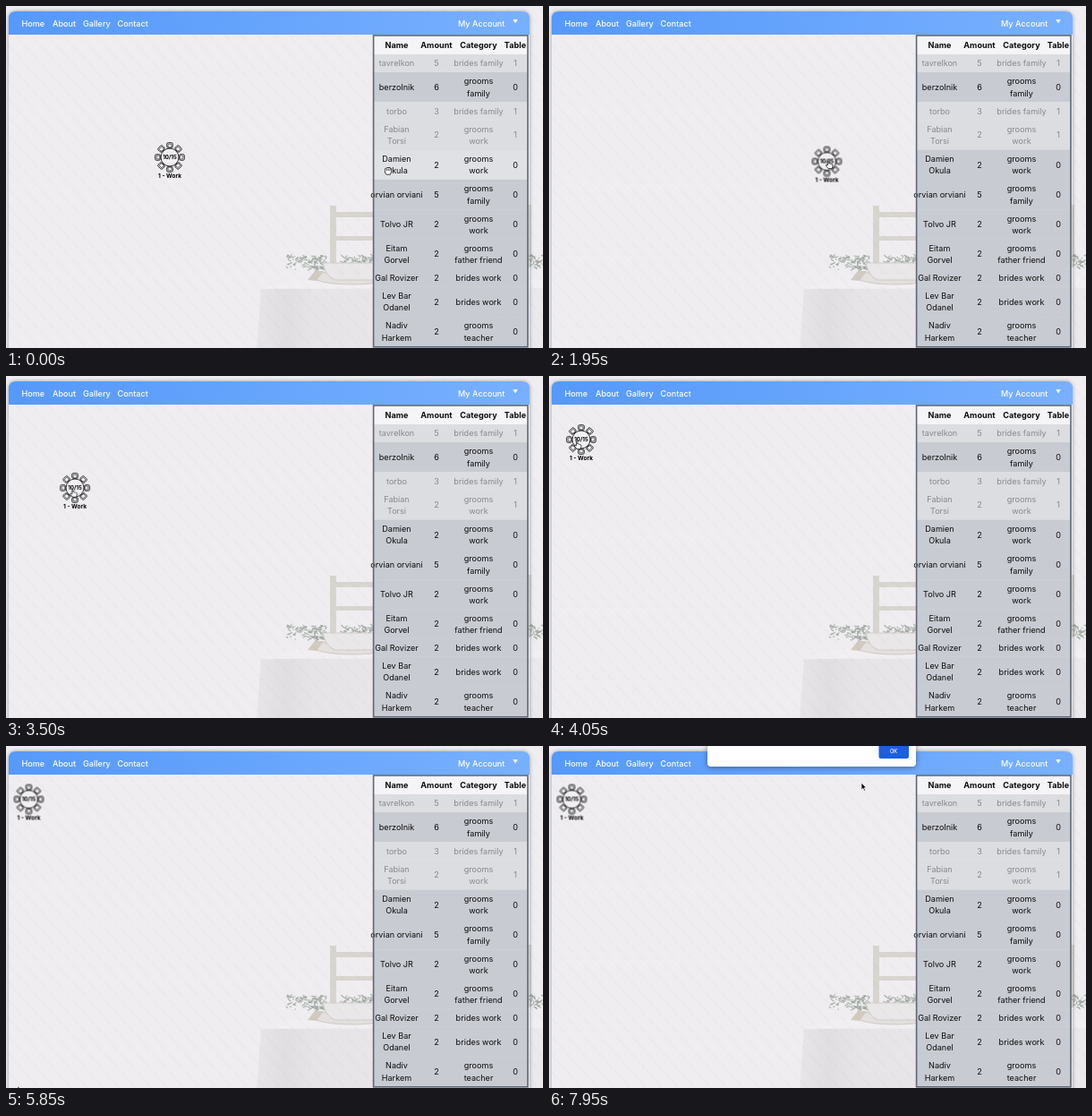
Animation of 600x382 px, one loop 8 s. Source, as an HTML page:

```html
<!DOCTYPE html>
<html lang="en">
<head>
<meta charset="utf-8">
<title>Seating plan</title>
<style>
  html, body { margin: 0; width: 100%; height: 100%; overflow: hidden; background: #efedf0; }
  #stage { position: relative; width: 600px; height: 382px; overflow: hidden; }
  svg { position: absolute; left: 0; top: 0; }
  .page { position: absolute; left: 3px; top: 6px; width: 582px; height: 400px;
    border-radius: 8px; box-shadow: 0 0 4px rgba(40, 50, 70, .45); }
  text { font-family: Inter, "Liberation Sans", sans-serif; font-size: 9.1px; }
  .mid { text-anchor: middle; }
  .bold { font-weight: 700; }
  .nav { fill: #fff; font-weight: 500; }
</style>
</head>
<body>
<div id="stage">
  <svg width="600" height="382" viewBox="0 0 600 382">
    <defs>
      <pattern id="waves" width="18" height="20" patternUnits="userSpaceOnUse">
        <path d="M1 3l4 2 1 4 4 2M10 13l4 2 1 4 3 1" fill="none" stroke="#6c6c78" stroke-opacity=".055"/>
      </pattern>
      <linearGradient id="cloth" x2="1" y2="0">
        <stop offset="0" stop-color="#e7e5e8"/>
        <stop offset=".1" stop-color="#e0dee1"/>
        <stop offset=".2" stop-color="#e6e4e7"/>
        <stop offset="1" stop-color="#ebe9ec"/>
      </linearGradient>
      <linearGradient id="bar" x2="1" y2="0">
        <stop offset="0" stop-color="#5599fa"/>
        <stop offset="1" stop-color="#78b0ff"/>
      </linearGradient>
      <filter id="soft"><feGaussianBlur stdDeviation=".6"/></filter>
    </defs>
    <rect width="600" height="382" fill="#efedf0"/>
    <g filter="url(#soft)">
      <g fill="#d8d4cf">
        <rect x="362" y="223" width="7" height="68"/>
        <rect x="581" y="222" width="6" height="70"/>
        <rect x="366" y="230" width="218" height="6"/>
        <rect x="366" y="257" width="218" height="5"/>
      </g>
      <path d="M285 316L320 309H600V382H280Z" fill="url(#cloth)"/>
      <path d="M285 316L320 306H600V315Z" fill="#f1eff1"/>
      <g id="leaves" stroke="#9ba69c" stroke-width="1.3" stroke-opacity=".75"/>
      <ellipse cx="387" cy="303" rx="43" ry="8" fill="#e3e0df" stroke="#cfcac5"/>
      <path d="M354 287H411V306H368Q357 302 354 287Z" fill="#e9e7e8" stroke="#d0cccb"/>
      <path d="M337 306l8-10h10l-8 11z" fill="#d2c9bf"/>
    </g>
    <rect width="600" height="382" fill="url(#waves)"/>
  </svg>
  <div class="page"></div>
  <svg width="600" height="382" viewBox="0 0 600 382">
    <path d="M3 32V14Q3 6 11 6H577Q585 6 585 14V32Z" fill="url(#bar)"/>
    <g class="nav">
      <text class="nav" x="17.5" y="22.8">Home</text>
      <text class="nav" x="52" y="22.8">About</text>
      <text class="nav" x="86" y="22.8">Gallery</text>
      <text class="nav" x="124.5" y="22.8">Contact</text>
      <text class="nav" x="505" y="22.8">My Account</text>
      <path d="M566.3 15h5.6l-2.8 4.6z"/>
    </g>
    <g id="guests"></g>
    <rect x="410.6" y="32.9" width="172.4" height="347.9" fill="none" stroke="#5d6874" stroke-width="1.6"/>

    <g id="table">
      <g id="seats" fill="#f4f3f5" stroke="#18181a"></g>
      <circle r="10" fill="#f1eff2" stroke="#18181a" stroke-width=".9"/>
      <text class="mid bold" y="1.6" style="font-size:6.2px">10/15</text>
      <text class="mid bold" y="23" style="font-size:6.5px">1 - Work</text>
    </g>

    <g id="alert">
      <rect x="177" y="-20" width="233" height="43" rx="4" fill="#fff"
        style="filter:drop-shadow(0 1px 3px rgba(0,0,0,.4))"/>
      <rect x="368.5" y="-6" width="33.5" height="20" rx="2.5" fill="#1a60dc"/>
      <text class="mid nav" x="385" y="8.2" style="font-size:5.6px">OK</text>
    </g>

    <g id="cursor" stroke-linejoin="round" stroke-width=".8">
      <path id="fist" fill="#fff" stroke="#111"
        d="M-3.6-.6Q-3.6-3.4-1.8-2.8Q-1-4.2 0-3Q1.2-4.2 2-2.8Q3.8-3.2 3.8-.8Q3.8 2 2.4 4.2H-2.2Q-4 2-3.6-.6ZM-1.6-1.8V0M.2-2V0M2-1.8V0"/>
      <path id="hand" fill="#fff" stroke="#111"
        d="M-1.6 1V-3.6Q-.9-4.8-.2-3.6V-1Q.8-1.8 1.4-.7Q2.4-1.2 2.9-.2Q4-.4 4 .9Q4 3 3 4.6H-1Q-2.4 2.6-3.8 1Q-3.4-.4-1.6 1Z"/>
      <path id="arrow" fill="#111" stroke="#fff" stroke-width=".7"
        d="M0 0V8L1.9 6.3 3.2 9.2 4.5 8.6 3.2 5.8H5.7Z"/>
    </g>
  </svg>
</div>
<script>
(() => {
  const LOOP = 8000;
  const $ = id => document.getElementById(id);

  function add(parent, tag, attrs, text) {
    const el = document.createElementNS("http://www.w3.org/2000/svg", tag);
    for (const k in attrs) el.setAttribute(k, attrs[k]);
    if (text) el.textContent = text;
    parent.append(el);
    return el;
  }

  // Guest list: name, amount, category, table ("/" breaks a line)
  const rows = [
    ["tavrelkon", 5, "brides family", 1],
    ["berzolnik", 6, "grooms/family", 0],
    ["torbo", 3, "brides family", 1],
    ["Fabian/Torsi", 2, "grooms/work", 1],
    ["Damien/Okula", 2, "grooms/work", 0],
    ["orvian orviani", 5, "grooms/family", 0],
    ["Tolvo JR", 2, "grooms/work", 0],
    ["Eitam/Gorvel", 2, "grooms/father friend", 0],
    ["Gal Rovizer", 2, "brides work", 0],
    ["Lev Bar/Odanel", 2, "brides work", 0],
    ["Nadiv/Harkem", 2, "grooms/teacher", 0]
  ];
  const cols = [436.5, 481, 528, 569];
  const LINE = 13.3;
  const DRAGGED = 4;
  const guests = $("guests");
  let rowY = 34, hover;

  function addRow(cells, fill, color, cls, dragged) {
    const lines = Math.max(...cells.map(c => String(c).split("/").length));
    const height = 6.7 + lines * LINE;
    const box = { x: 411, y: rowY, width: 172, height: height + .1 };
    add(guests, "rect", { ...box, fill });
    if (dragged) hover = add(guests, "rect", { ...box, fill: "#e0e1e5" });
    cells.forEach((cell, c) => {
      const parts = String(cell).split("/");
      parts.forEach((part, i) => add(guests, "text", {
        class: "mid " + cls, x: cols[c], fill: color,
        y: rowY + height / 2 + 3.3 + (i - (parts.length - 1) / 2) * LINE
      }, part));
    });
    rowY += height;
  }
  addRow(["Name", "Amount", "Category", "Table"], "#f5f4f7", "#0c0c0e", "bold");
  rows.forEach((r, i) => addRow(r, r[3] ? "#dcdde1" : "#c8cbd1",
    r[3] ? "#87888c" : "#0c0c0e", "", i === DRAGGED));

  // Eight chairs round the table
  for (let i = 0; i < 8; i++) {
    const g = add($("seats"), "g", { transform: `rotate(${i * 45}) translate(0 -13.4)` });
    add(g, "rect", { x: -3.3, y: -2.9, width: 6.6, height: 5.6, rx: 1.5, "stroke-width": .9 });
    add(g, "rect", { x: -2, y: -1.5, width: 4, height: 3.8, rx: .8, "stroke-width": .7 });
  }

  // Sprigs beside the plate
  let seed = 7;
  const rnd = () => (seed = seed * 16807 % 2147483647) / 2147483647;
  function sprigs(x, w, y, h, n) {
    for (let i = 0; i < n; i++) {
      const px = x + rnd() * w, py = y + rnd() * h;
      add($("leaves"), "path", { d: `M${px} ${py}l${rnd() * 10 - 5} ${rnd() * 6 - 3}` });
    }
  }
  sprigs(315, 42, 279, 15, 110);
  sprigs(376, 36, 279, 9, 60);
  sprigs(586, 14, 278, 14, 35);

  const opts = { duration: LOOP, iterations: Infinity };

  function move(el, keys) {
    el.animate(keys.map(([t, x, y, easing = "linear"]) => ({
      offset: t / LOOP, transform: `translate(${x}px, ${y}px)`, easing
    })), opts);
  }

  // Visible only from one time to another, with hard cuts
  function show(el, from, to) {
    const at = (t, opacity) => ({ offset: t / LOOP, opacity, easing: "step-end" });
    const keys = [at(from, 1)];
    if (from > 0) keys.unshift(at(0, 0));
    if (to < LOOP) keys.push(at(to, 0));
    keys.push(at(LOOP, to < LOOP ? 0 : 1));
    el.animate(keys, opts);
  }

  const IN = "ease-in", OUT = "ease-out", BOTH = "ease-in-out";

  move($("table"), [
    [0, 183, 169], [850, 183, 169, IN], [1000, 199, 169.5, BOTH],
    [1950, 310.5, 173.5, BOTH], [2750, 147.5, 217.5, BOTH],
    [4050, 36, 71, OUT], [4600, 25.5, 59.5], [LOOP, 25.5, 59.5]
  ]);

  move($("cursor"), [
    [0, 427, 184], [50, 427, 184, BOTH], [800, 197, 171],
    [850, 197, 171, IN], [1000, 213, 171, BOTH],
    [1950, 313, 177, BOTH], [2750, 150, 223, BOTH],
    [4050, 32, 77, OUT], [4600, 22, 66], [4950, 22, 66, BOTH],
    [5750, 13, 379.5], [5850, 13, 379.5], [6000, 13, 400],
    [7450, 20, 400], [7500, 84, 280, OUT], [7950, 349, 41], [LOOP, 349, 41]
  ]);

  show($("fist"), 0, 850);
  show($("hand"), 850, 4950);
  show($("arrow"), 4950, LOOP);
  show($("alert"), 7050, LOOP);
  show(hover, 0, 200);
})();
</script>
</body>
</html>
```
